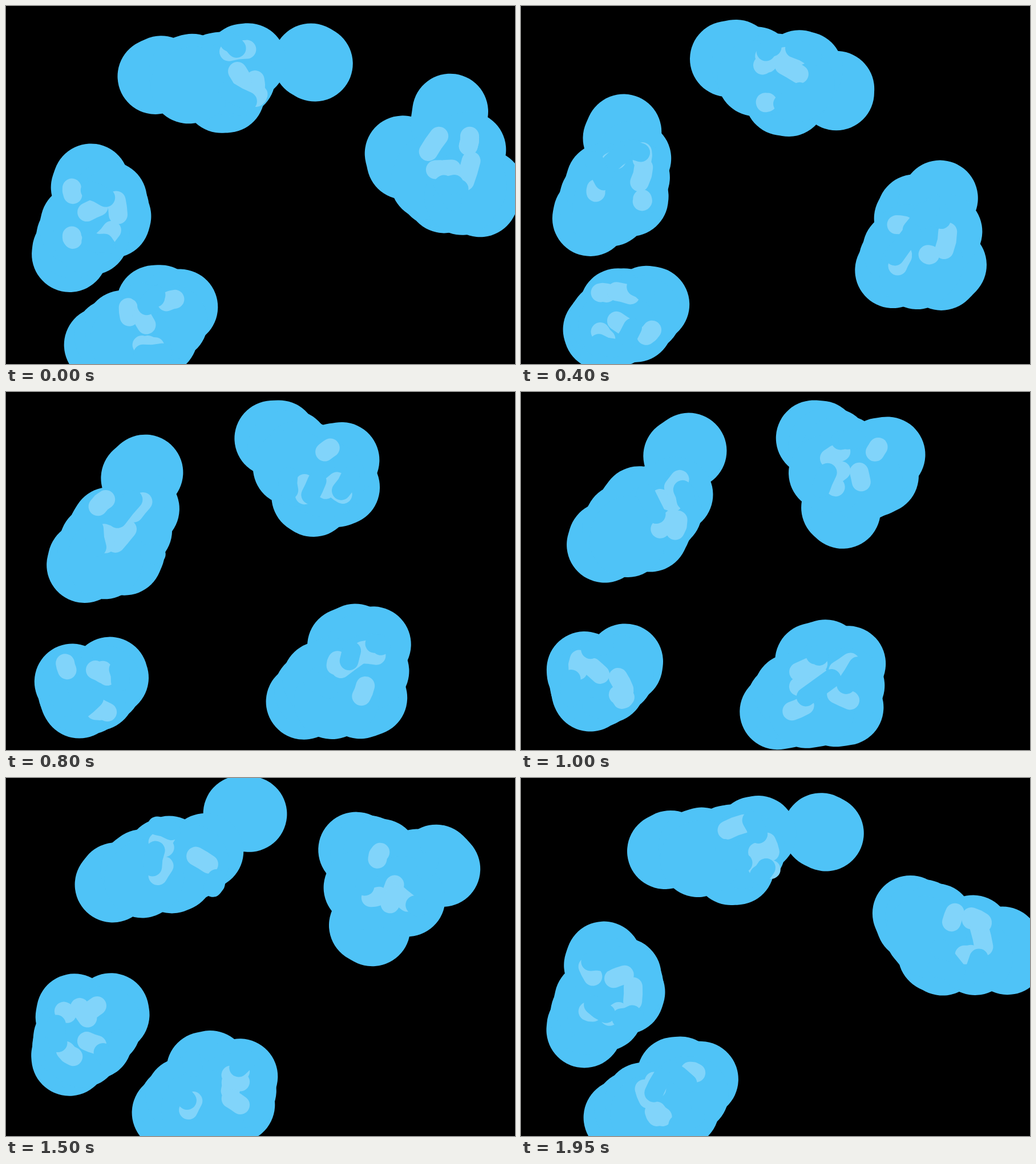
These frames come from a looping animation (892x628 px, 2 s). An HTML page:

```html
<!DOCTYPE html>
<html lang="en">
<head>
<meta charset="utf-8">
<title>Drifting blobs</title>
<style>
  html, body { margin: 0; width: 100%; height: 100%; overflow: hidden; background: #000; }
  svg { display: block; width: 892px; height: 628px; }
  path { fill: none; stroke-linecap: round; stroke-linejoin: round; }
</style>
</head>
<body>
<svg id="stage" viewBox="0 0 892 628"></svg>
<script>
const LOOP = 2000, STEP = 50, CLUSTERS = 4, KEY_GAP = LOOP / 3;
const BLUE = '#4fc3f7', LIGHT = '#81d4fa';
const stage = document.getElementById('stage');
const blobs = [];

let seed = 11;
const random = (low, high) => {
  seed = (seed * 16807) % 2147483647;
  return low + (high - low) * seed / 2147483647;
};

const mix = (a, b, share) => t => {
  const [ax, ay] = a(t), [bx, by] = b(t);
  return [ax + (bx - ax) * share, ay + (by - ay) * share];
};

// Smooth open path through evenly timed key points, with rounded ends.
function route(...keys) {
  const last = keys.length - 1;
  const beyond = (a, b, c) => a.map((v, d) => 3 * v - 3 * b[d] + c[d]);
  const points = [
    beyond(keys[0], keys[1], keys[2]),
    ...keys,
    beyond(keys[last], keys[last - 1], keys[last - 2])
  ];
  return t => {
    const i = Math.max(0, Math.min(last - 1, Math.floor(t / KEY_GAP)));
    const u = t / KEY_GAP - i;
    const [p, q, r, s] = points.slice(i, i + 4);
    return q.map((v, d) => v + u / 2 * (r[d] - p[d]
      + u * (2 * p[d] - 5 * v + 4 * r[d] - s[d]
      + u * (3 * (v - r[d]) + s[d] - p[d]))));
  };
}

// Four routes shape a cluster. Each spans four loops,
// and the clusters follow them one loop apart.
const head = route(
  [697, 266], [643, 420], [393, 501], [265, 521], [129, 520], [115, 443], [147, 313],
  [212, 172], [375, 65], [538, 99], [564, 172], [696, 138], [803, 300]);
const side = route(
  [777, 196], [674, 419], [447, 515], [300, 528], [190, 510], [187, 433], [180, 343],
  [217, 227], [322, 147], [420, 97], [549, 122], [722, 122], [857, 325]);
const belly = route(
  [836, 329], [670, 520], [448, 567], [264, 580], [168, 535], [150, 482], [187, 372],
  [200, 308], [270, 184], [382, 156], [515, 175], [607, 243], [745, 318]);
const tail = route(
  [775, 322], [576, 519], [345, 577], [172, 595], [133, 548], [113, 504], [112, 432],
  [133, 322], [172, 208], [267, 121], [441, 83], [588, 104], [692, 262]);
const core = mix(mix(head, tail, 0.5), mix(side, belly, 0.5), 0.5);

// A quick seeded orbit around the middle of the cluster.
function orbit(reach) {
  const span = LOOP * CLUSTERS;
  const [fx, fy] = [0, 0].map(() => 2 * Math.PI * Math.round(random(8, 15)) / span);
  const [px, py] = [0, 0].map(() => random(0, 2 * Math.PI));
  return t => {
    const [x, y] = core(t);
    return [x + reach * Math.sin(fx * t + px), y + reach * Math.sin(fy * t + py)];
  };
}

function addBlob(color, width, place) {
  for (let lap = 0; lap < CLUSTERS; lap++) {
    const path = document.createElementNS('http://www.w3.org/2000/svg', 'path');
    path.setAttribute('stroke', color);
    path.setAttribute('stroke-width', width);
    stage.append(path);
    blobs.push({ path, place, offset: lap * LOOP });
  }
}

const bodies = [
  head, side, belly, tail,
  mix(tail, head, 0.2), mix(tail, head, 0.4),
  mix(side, belly, 0.5), mix(belly, tail, 0.5)
];
bodies.forEach(place => addBlob(BLUE, 133, place));
for (let i = 0; i < 5; i++) addBlob(LIGHT, 33, orbit(42));
for (let i = 0; i < 3; i++) addBlob(BLUE, 33, orbit(55));

// Each blob is smeared along the way it travels during one step.
function draw(ms) {
  const time = Math.floor((ms % LOOP) / STEP) * STEP;
  for (const { path, place, offset } of blobs) {
    const spots = [-0.5, 0, 0.5].map(part =>
      place(time + offset + part * STEP).map(v => v.toFixed(1)).join(' '));
    path.setAttribute('d', 'M' + spots.join('L'));
  }
}

const start = performance.now();
function tick() {
  draw(performance.now() - start);
  requestAnimationFrame(tick);
}
tick();
</script>
</body>
</html>
```
